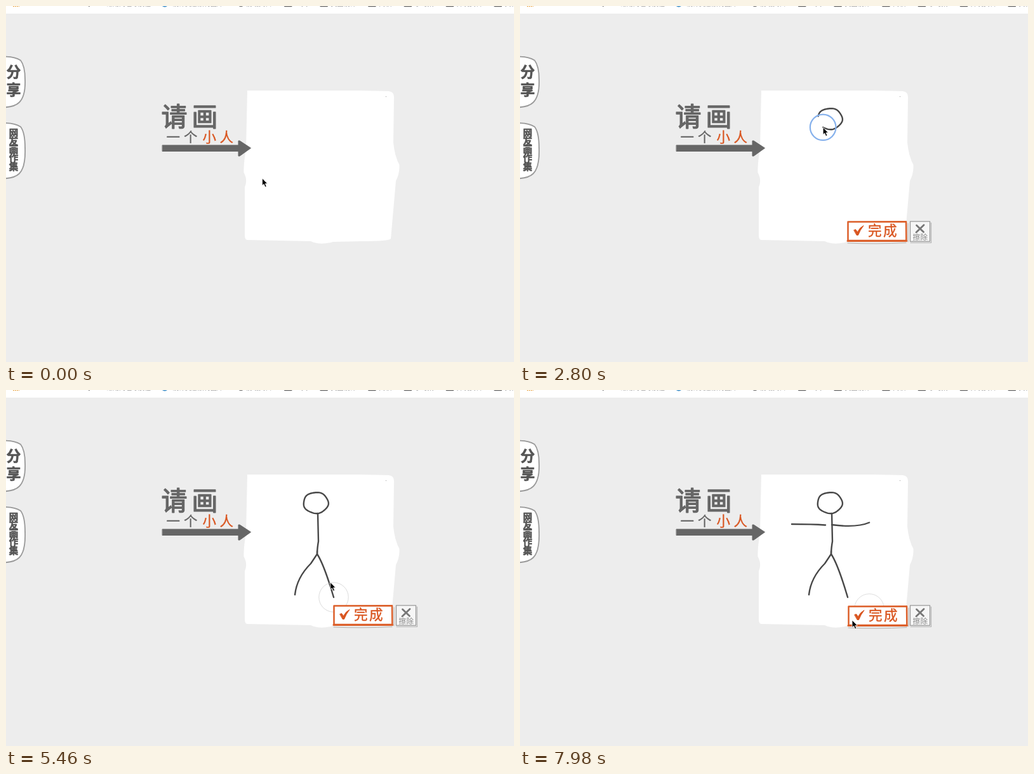
Recreate the animation shown at these times as an HTML page. Size 800 by 560 pixels, loop 8 s.

```html
<!DOCTYPE html>
<html lang="zh">
<head>
<meta charset="utf-8">
<title>请画一个小人</title>
<style>
  html, body { margin: 0; width: 100%; height: 100%; overflow: hidden; background: #ededed; }
  svg { display: block; width: 800px; height: 560px; }
  text { font-family: "Noto Sans CJK SC", "Noto Sans CJK", "Noto Sans", sans-serif; }
  .round { stroke-linejoin: round; stroke-linecap: round; }
  .orange { fill: #d9541e; stroke: #d9541e; }
</style>
</head>
<body>
<svg viewBox="0 0 800 560" xmlns="http://www.w3.org/2000/svg">
  <rect width="800" height="560" fill="#ededed"/>
  <rect width="800" height="12" fill="#fff"/>
  <g id="bookmarks" font-size="10" fill="#666">
    <path d="M11 0H21" stroke="#e8a13c" stroke-width="2" stroke-dasharray="2 1"/>
    <path d="M126 -1l4 -2 2 4z" fill="#333"/>
    <circle cx="250" cy="-4" r="5.7" fill="#4a96cc"/>
    <circle cx="370" cy="-4" r="5.2" fill="#777"/>
  </g>

  <path fill="#fff" d="M380 133L556 133 603 134Q611 135 611 143L610 215Q612 236 619.500 250
    Q620 264 614 275L606 366Q603 370 560 370L515 371Q495 377 480 370L380 368Q376 368 376 360L376 285
    Q381 274 374.500 262 374 248 378 225Z"/>
  <circle cx="598.500" cy="142.500" r=".8" fill="#bbb"/>

  <g id="tabs" class="round" fill="#fff" stroke="#999" stroke-width="1.800"></g>
  <g id="labels" class="round" fill="#555" stroke="#555" stroke-width=".6" text-anchor="middle" font-weight="900"></g>

  <g class="round" fill="#666" stroke="#666">
    <text x="244.500 292.500" y="188.500" font-size="41" font-weight="500" stroke-width="1.400">请画</text>
    <g font-size="21.500" stroke-width=".3">
      <text x="252.500 280" y="213.500">一个</text>
      <text x="309.500 336.500" y="213.500" class="orange">小人</text>
    </g>
    <path d="M246.500 219H366V212H368L385.500 223.500 368 236H366V228.500H246.500Z"/>
  </g>

  <g id="ink" class="round" fill="none" stroke="#484848" stroke-width="2.400"></g>
  <circle id="fading" fill="none" stroke="#c4c4c4"/>

  <g id="buttons" class="round">
    <g id="done">
      <path d="M516 373Q560 375 608 372.500M611 342V371" stroke="#b5b0ad" fill="none"/>
      <path d="M516.500 339.500L608 339.300 608.300 369 516.500 369Z" fill="#fff" stroke="#dc5f2a" stroke-width="2.500"/>
      <path d="M516 369.500H608.500" stroke="#dc5f2a" stroke-width="3"/>
      <path d="M526 352.500L528.500 351.500 531.500 355.500Q535 348.500 541 345.500Q535.500 352.500 532.500 360.500H530.500Z" class="orange"/>
      <text x="548 572" y="361" font-size="21.500" font-weight="500" stroke-width=".4" class="orange">完成</text>
    </g>
    <path d="M615 372.500H647.500V341" stroke="#b5b5b5" stroke-width="1.200" fill="none"/>
    <rect x="614.500" y="338.800" width="31" height="31.500" fill="#f6f6f6" stroke="#999" stroke-width="1.300"/>
    <path d="M624.500 345L635.500 355.500M636 344.500L624 356" stroke="#777" stroke-width="2.800"/>
    <text x="618.500 630.500" y="367.500" font-size="11.500" fill="#888">擦除</text>
  </g>

  <circle id="ring" r="20.300" fill="none" stroke="#86b1ec" stroke-width="2.200"/>
  <path id="cursor" d="M0 0V11.500L2.600 9.200 4.600 13.800 6.700 12.900 4.800 8.500H8.300Z" stroke="#fff" stroke-width=".8"/>
</svg>

<script>
const LOOP = 8000, FADE = 300, RADIUS = 20.3;
const $ = id => document.getElementById(id);

function add(parent, tag, attrs, text) {
  const el = document.createElementNS("http://www.w3.org/2000/svg", tag);
  set(el, attrs);
  if (text) el.textContent = text;
  return $(parent).appendChild(el);
}

function set(el, attrs) {
  for (const k in attrs) el.setAttribute(k, attrs[k]);
}

const show = (el, on) => { el.style.display = on ? "" : "none"; };

// Side tab with its label running downwards.
function tab(y, h, label, size, pitch) {
  const low = y + h;
  add("tabs", "path", {
    d: `M-3 ${y}Q14 ${y} 23 ${y + 6}Q30 ${y + 15} 30 ${y + h * 0.45}Q31 ${low - 18} 21 ${low - 8}Q14 ${low - 1} -3 ${low}`
  });
  const first = y + h / 2 - pitch * (label.length - 1) / 2 + size * 0.38 - 2;
  [...label].forEach((ch, i) =>
    add("labels", "text", { x: 12, y: first + i * pitch, "font-size": size }, ch));
}
tab(79.5, 80, "分享", 23, 28);
tab(184, 87.5, "网友画作集", 14.5, 13.2);

// Bookmarks: only their lowest pixels reach into the stage.
const caption = (x, s) => add("bookmarks", "text", { x, y: 0, opacity: 0.7 }, s);
caption(158, "常用网址导航栏");
caption(262, "设计灵感素材图库");
caption(378, "前端文档");
let folderX = 438;
for (const name of ["工具", "交互设计", "阅读", "学习集", "开发资料", "其他"]) {
  add("bookmarks", "rect", { x: folderX, y: -7, width: 12.5, height: 8.2, rx: 1 });
  caption(folderX + 17, name);
  folderX += 37 + 9.7 * name.length;
}

// Slightly five-cornered oval, a little more than one turn.
function headPath() {
  const pts = [];
  for (let a = 3.4; a < 9.85; a += 0.1) {
    const k = 1 + 0.025 * Math.cos(5 * (a - 0.14));
    pts.push([488 + 19.5 * k * Math.cos(a), 177.5 + 16.5 * k * Math.sin(a)]);
  }
  return "M" + pts.join("L");
}

// Each act glides to the start of its path, then holds the button down along it.
const acts = [
  { glide: 900, hold: 400, d: "M493 163.5h.01" },
  { glide: 380, hold: 964, d: headPath(), ink: true },
  { glide: 500, hold: 1000, d: "M491 194L492 238Q490 250 490 258L480 273Q458 295 455 322", ink: true },
  { glide: 350, hold: 500, d: "M490 253V258Q501 275 516 326", ink: true },
  { glide: 400, hold: 430, d: "M491 212Q530 217 550 208.5", ink: true },
  { glide: 450, hold: 440, d: "M481 212.5Q460 211 428 211", ink: true },
  { glide: 540, hold: 250, d: "M550 344h.01" },
  { glide: 130, hold: 0, d: "M523 362h.01" }
];
let clock = 350, last = { x: 403.5, y: 271 };
for (const act of acts) {
  act.el = add("ink", "path", { d: act.d });
  act.len = act.el.getTotalLength();
  act.from = last;
  act.start = clock;
  act.down = clock + act.glide;
  act.up = clock = act.down + act.hold;
  act.first = act.el.getPointAtLength(0);
  last = act.el.getPointAtLength(act.len);
}
const firstInk = acts.find(a => a.ink);
const confirm = acts.find(a => a.start > 7000);

const clamp = u => Math.max(0, Math.min(1, u));
const ease = u => u * u * (3 - 2 * u);
const mix = (a, b, u) => a + (b - a) * u;

function cursorAt(t) {
  const act = acts.find(a => t < a.up) || acts[acts.length - 1];
  if (t >= act.down) {
    return act.el.getPointAtLength(act.len * clamp((t - act.down) / (act.hold || 1)));
  }
  const u = ease(clamp((t - act.start) / act.glide));
  return { x: mix(act.from.x, act.first.x, u), y: mix(act.from.y, act.first.y, u) };
}

function draw(t) {
  for (const a of acts) {
    const u = clamp((t - a.down) / (a.hold || 1));
    show(a.el, a.ink && u > 0);
    set(a.el, { "stroke-dasharray": u < 1 ? `${a.len * u} ${a.len + 9}` : "none" });
  }
  const { x, y } = cursorAt(t);
  set($("cursor"), { transform: `translate(${x} ${y})` });

  const held = acts.some(a => t >= a.down && t < a.up);
  show($("ring"), held);
  set($("ring"), { cx: x, cy: y });

  const freed = !held && acts.find(a => t >= a.up && t < a.up + FADE);
  show($("fading"), freed);
  if (freed) {
    const u = (t - freed.up) / FADE;
    const end = freed.el.getPointAtLength(freed.len);
    set($("fading"), { cx: end.x, cy: end.y, r: RADIUS + 3 * clamp(u * 2.5), opacity: 1 - u });
  }

  show($("buttons"), t >= firstInk.down);
  set($("done"), { transform: t >= confirm.down - 100 ? "translate(1 1)" : "" });
}

function tick(now) {
  draw(now % LOOP);
  requestAnimationFrame(tick);
}
tick(performance.now());
</script>
</body>
</html>
```
